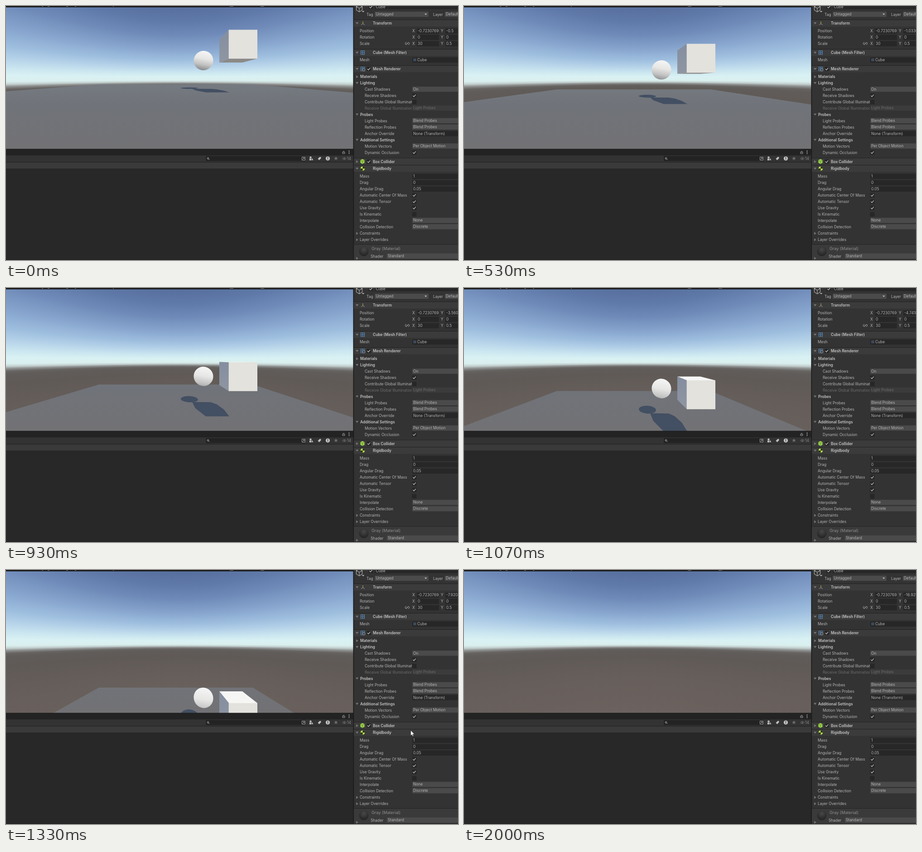
These frames come from a looping animation (998 px wide and 561 px high, 2140 ms). An HTML page with a canvas:

```html
<!DOCTYPE html>
<html lang="en">
<head>
<meta charset="utf-8">
<title>Falling rigidbodies</title>
<style>
html, body { margin: 0; width: 100%; height: 100%; overflow: hidden; background: #282828; }
canvas, svg { position: absolute; left: 0; top: 0; display: block; }
text { font: 8.38px Inter, Roboto, sans-serif; fill: #b6b6b6; white-space: pre; }
.bold { font-weight: 600; fill: #c6c6c6; }
.dim { fill: #6c6c6c; }
</style>
</head>
<body>
<canvas id="sky" width="767" height="316"></canvas>
<svg id="stage" width="998" height="561" viewBox="0 0 998 561">
  <defs>
    <clipPath id="view"><rect x="0" y="3" width="767" height="313"/></clipPath>
    <clipPath id="labels"><rect x="768" width="128" height="561"/></clipPath>
    <clipPath id="posX"><rect x="907" width="48" height="100"/></clipPath>
    <linearGradient id="ground" gradientUnits="userSpaceOnUse" x1="0" y1="168" x2="0" y2="316">
      <stop offset="0" stop-color="#767b82"/><stop offset=".35" stop-color="#707379"/>
      <stop offset="1" stop-color="#727275"/>
    </linearGradient>
    <linearGradient id="side" x2="0" y2="1">
      <stop offset="0" stop-color="#848e9f"/><stop offset="1" stop-color="#8f96a2"/>
    </linearGradient>
    <linearGradient id="white" x1=".6" y1="0" x2=".4" y2="1">
      <stop offset="0" stop-color="#f6f6f6"/><stop offset=".4" stop-color="#e6e6e5"/>
      <stop offset=".7" stop-color="#c2c2c2"/><stop offset="1" stop-color="#86878a"/>
    </linearGradient>
    <radialGradient id="gray" cx=".5" cy=".3" r=".7">
      <stop offset="0" stop-color="#484848"/><stop offset="1" stop-color="#222"/>
    </radialGradient>
  </defs>
  <g clip-path="url(#view)">
    <path id="floor" fill="url(#ground)"/>
    <g fill="#434f62"><ellipse id="ballShade"/><path id="cubeShade"/></g>
    <ellipse id="ball" fill="url(#white)"/>
    <path id="cubeTop" fill="#f6f6f5"/>
    <path id="cubeBottom" fill="#8b8985"/>
    <path id="cubeSide" fill="url(#side)"/>
    <path id="cubeFront" fill="#e3e2dd"/>
  </g>
  <g id="ui"></g>
  <text id="posY" x="972" y="58"></text>
  <path id="cursor" d="M0 0V12L2.8 9.5L4.6 13.5L6.4 12.7L4.7 8.8H8.4Z" fill="#fff" stroke="#222" stroke-width=".7"/>
</svg>
<script>
const byId = id => document.getElementById(id);
const set = (id, attrs) => {
  for (const key in attrs) byId(id).setAttribute(key, attrs[key]);
};
const poly = points => "M" + points.map(p => p.map(v => v.toFixed(2)).join(" ")).join("L") + "Z";
const CX = 383.5, CY = 160;

// The horizon bends as elevation is projected onto a flat view.
function paintSky() {
  const ctx = byId("sky").getContext("2d");
  const sky = ctx.createLinearGradient(0, -160, 0, 160);
  [[-160, "#566e9c"], [-125, "#5f79a9"], [-95, "#6f8ab8"], [-65, "#86a4cd"], [-40, "#9fbfdf"],
   [-25, "#b6d3e9"], [-13, "#cbe6f0"], [-4, "#d9f1f3"], [4, "#daf0ef"], [7.5, "#c3d0cf"],
   [10.5, "#8d908f"], [14, "#666361"], [18, "#605c59"], [30, "#605a57"], [80, "#675f5b"], [160, "#6c625f"]]
    .forEach(([e, color]) => sky.addColorStop((e + 160) / 320, color));
  ctx.fillStyle = sky;
  for (let x = 0; x < 767; x++) {
    ctx.setTransform(1, 0, 0, Math.hypot(1, (x - CX) / 270), x, CY);
    ctx.fillRect(0, -160, 1, 320);
  }
}

let ui = "";
const rect = (x, y, w, h, fill, more = "") =>
  ui += `<rect x="${x}" y="${y}" width="${w}" height="${h}" fill="${fill}" ${more}/>`;
const path = (d, fill, stroke = "none", width = 1) =>
  ui += `<path d="${d}" fill="${fill}" stroke="${stroke}" stroke-width="${width}"/>`;
const circle = (x, y, r, fill, more = "") =>
  ui += `<circle cx="${x}" cy="${y}" r="${r}" fill="${fill}" ${more}/>`;
const text = (x, y, s, kind = "", more = "") =>
  ui += `<text x="${x}" y="${y + 3}" class="${kind}" ${more}>${s}</text>`;
const label = (x, y, s, kind = "") => {
  ui += '<g clip-path="url(#labels)">';
  text(x, y, s, kind);
  ui += "</g>";
};
const fold = (y, open) =>
  path(open ? `M772 ${y - 2}h6.4l-3.2 4.6z` : `M773.2 ${y - 3}v6.4l4.6-3.2z`, "#747474");
function check(x, y, on = true) {
  rect(x - 5, y - 5, 10, 10, "#272727", 'rx="1.5"');
  if (on) path(`M${x - 3} ${y}l2.2 2.3l4-4.6`, "none", "#cfcfcf", 1.2);
}
function field(x, y, w, s, more = "") {
  rect(x, y - 5.5, w, 11.5, "#272727", 'rx="1.5"');
  text(x + 2, y, s, "", more);
}
function dropdown(y, s, kind = "", x = 897) {
  rect(x, y - 6, 998 - x + 3, 11.5, kind ? "#3b3b3b" : "#4a4a4a", 'rx="1.5"');
  text(x + 2, y - .3, s, kind);
}
function header(y, s, open, checked) {
  rect(768, y - 8, 230, 1, "#222");
  rect(768, y - 7, 230, 14.5, "#3b3b3b");
  fold(y, open);
  if (checked) check(801, y);
  text(810, y, s, "bold");
}
const grid = y => {
  rect(783, y - 4.5, 9, 9, "#2c4258");
  path(`M783 ${y - 4}h9m-9 4h9m-9 4h9M783.5 ${y - 4.5}v9m4-9v9m4-9v9`, "none", "#7399bb", .8);
};

function drawPanels() {
  rect(0, 0, 767, 3, "#1d1d1d");
  [[79, 3], [92, 4], [133, 4], [152, 3], [236, 2], [494, 8], [562, 8]]
    .forEach(([x, w]) => rect(x, 0, w, 1.2, "#757575"));

  rect(0, 316, 767, 14, "#232323");
  rect(0, 315.5, 767, 1, "#191919");
  rect(0, 330, 767, 14.5, "#333");
  rect(0, 344.5, 767, 1, "#202020");
  rect(0, 345.5, 767, 14, "#3a3a3a");
  rect(0, 359, 767, 1, "#252525");
  rect(0, 360, 767, 201, "#282828");
  rect(441, 331.5, 221, 11, "#232323", 'rx="2"');
  circle(446, 336.5, 1.7, "none", 'stroke="#bbb"');
  path("M447.3 337.8l2 2", "none", "#bbb", 1);
  path("M653.5 333.5h7v7h-7zM655 339l3.5-3.5m-2.5 0h2.5v2.5", "none", "#b5b5b5", .9);
  circle(672.5, 334.5, 2.2, "#bcbcbc");
  path("M670 337h4v4h-4zM675.5 335.5l3 5h-4z", "#bcbcbc");
  path("M688.5 337.5l4-4h3v3l-4 4z", "#c0c0c0");
  circle(710.5, 336.8, 4.6, "#c6c6c6");
  rect(709.8, 333.7, 1.4, 4, "#333");
  rect(709.8, 338.6, 1.4, 1.3, "#333");
  path("M728.5 332.3l1.3 3h3.2l-2.5 2 1 3.2-3-1.9-3 1.9 1-3.2-2.5-2h3.2z", "#6e6e6e");
  path("M742.5 337q4.5-5 9 0q-4.5 5-9 0z", "none", "#6e6e6e", 1);
  circle(747, 337, 1.5, "#6e6e6e");
  text(753, 337, "14", "", 'style="fill:#8c8c8c"');
  path("M743 323h5v3h-5zM744 323v-1.4q1.6-2.3 3.2 0v.6", "none", "#a8a8a8", .9);
  [320, 323, 326].forEach(y => circle(757.5, y, .9, "#c4c4c4"));

  rect(767, 0, 231, 561, "#333");
  rect(766.5, 0, 1.7, 561, "#1a1a1a");
  path("M773.5 1l6.5-4 6.5 4v8l-6.5 4-6.5-4zM773.5 1l6.5 4 6.5-4M780 5v8", "none", "#a8a8a8", 1.2);
  path("M785.5 11h6l-3 3z", "#b0b0b0");
  check(805.5, 2);
  rect(814, -5, 186, 12, "#272727");
  text(816.5, 2, "Cube");
  text(796, 18.5, "Tag");
  rect(814, 12.5, 119, 11.5, "#4a4a4a", 'rx="1.5"');
  text(816.5, 18, "Untagged");
  path("M924 16.7h5.6l-2.8 3.3z", "#bbb");
  text(943, 18.5, "Layer");
  dropdown(18.5, "Default", "", 969);

  header(38, "Transform", true);
  path("M788 40v-6", "none", "#a3b83f", 1.2);
  path("M788 39l-4 2.5", "none", "#bd6a58", 1.2);
  path("M788 39l4 2.5", "none", "#5a90c8", 1.2);
  [["Position", "-0.7230769", ""], ["Rotation", "0", "0"], ["Scale", "30", "0.5"]]
    .forEach(([name, x, y], i) => {
      const row = 55 + 14 * i;
      text(781, row, name);
      text(897, row, "X");
      text(960, row, "Y");
      field(907, row, 49, x, 'clip-path="url(#posX)"');
      field(970, row, 30, y);
    });
  path("M884.5 80.5h-1a2.2 2.2 0 0 0 0 4.5h1m3-4.5h1a2.2 2.2 0 0 1 0 4.5h-1M884 82.8h4M883 86l6-6", "none", "#aaa", .9);

  header(103, "Cube (Mesh Filter)", true);
  grid(103);
  text(781, 119, "Mesh");
  field(897, 119, 103, "");
  rect(899.5, 116, 6, 6, "#47586d");
  path("M899.5 119h6m-3-3v6", "none", "#263443", .8);
  text(908, 119, "Cube");

  header(139, "Mesh Renderer", true, true);
  grid(139);
  circle(790, 141, 2.6, "#333", 'stroke="#b5c6d4" stroke-width=".8"');
  [[156, "Materials", false], [170, "Lighting", true], [239.5, "Probes", true],
   [295.5, "Additional Settings", true]].forEach(([y, s, open]) => {
    fold(y, open);
    text(782, y, s, "bold");
  });
  [[184, "Cast Shadows", "On"], [253.5, "Light Probes", "Blend Probes"],
   [267.5, "Reflection Probes", "Blend Probes"], [309.5, "Motion Vectors", "Per Object Motion"]]
    .forEach(([y, s, value]) => { label(792, y, s); dropdown(y, value); });
  [[198, "Receive Shadows", true], [212, "Contribute Global Illumination", false],
   [323.5, "Dynamic Occlusion", true]]
    .forEach(([y, s, on]) => { label(792, y, s); check(901.5, y, on); });
  label(792, 226, "Receive Global Illumination", "dim");
  dropdown(225.5, "Light Probes", "dim");
  label(792, 281.5, "Anchor Override");
  field(897, 281.5, 103, "None (Transform)");

  header(343.5, "Box Collider", false, true);
  path("M787 338l4.6 2.3v6L787 349l-4.6-2.7v-6z", "#9bd14b");
  path("M782.5 340.5l4.5 2.3 4.5-2.3M787 343v5.5", "none", "#4f7924", .8);
  header(359, "Rigidbody", true);
  circle(787.5, 359, 4.8, "#b6dc55");
  path("M787.5 359v-4.8a4.8 4.8 0 0 1 4.8 4.8zM787.5 359v4.8a4.8 4.8 0 0 1-4.8-4.8z", "#263015");
  ["Mass", "Drag", "Angular Drag"].forEach((s, i) => {
    text(781, 376 + 14 * i, s);
    field(897, 376 + 14 * i, 103, ["1", "0", "0.05"][i]);
  });
  ["Automatic Center Of Mass", "Automatic Tensor", "Use Gravity", "Is Kinematic"].forEach((s, i) => {
    text(781, 418 + 14 * i, s);
    check(901.5, 418 + 14 * i, i < 3);
  });
  ["Interpolate", "Collision Detection"].forEach((s, i) => {
    text(781, 474 + 14 * i, s);
    dropdown(473.7 + 14 * i, ["None", "Discrete"][i]);
  });
  ["Constraints", "Layer Overrides"].forEach((s, i) => {
    fold(502 + 14 * i, false);
    text(781, 502 + 14 * i, s);
  });

  rect(768, 526, 230, 1, "#222");
  rect(768, 527, 230, 34, "#3a3a3a");
  circle(790, 542, 10.5, "url(#gray)");
  text(807, 535.5, "Gray (Material)", "", 'style="font-size:9.1px;fill:#909090"');
  text(805, 552.5, "Shader");
  dropdown(552.5, "Standard", "", 841);
  fold(557, false);
  rect(0, 560, 998, 1, "#1c1c1c");
  byId("ui").innerHTML = ui;
}

function keyed(at, keys) {
  if (at <= keys[0][0]) return keys[0][1];
  for (let i = 1; i < keys.length; i++) {
    const [t0, a] = keys[i - 1], [t1, b] = keys[i];
    if (at <= t1) return a + (b - a) * (at - t0) / (t1 - t0);
  }
  return keys[keys.length - 1][1];
}

// Square root of the drop grows linearly in free fall.
const fallKeys = [[1.3, 0], [8, 5.568], [12, 8.803], [16, 12.309], [20, 15.54], [24, 18.73], [30, 23.6]];
const stepKeys = [[3.7, 0], [8, 16], [12, 31], [16, 46], [20, 61], [24, 75], [30, 91]];
const cursorX = [[18, 972], [20, 893.5], [24, 842], [30, 850]];
const cursorY = [[18, 453], [20, 354], [24, 276], [29, -20]];
const shadeOutline = [[411, .618], [452, .622], [465, .652], [481, .73], [493, .832], [441, .832], [418, .71]];

function render(ms) {
  let tick = Math.floor(ms / (200 / 3)) + 1;
  while (Math.round(tick * 20 / 3) * 10 > ms) tick--;
  tick = Math.min(tick, 30);
  const drop = keyed(tick, fallKeys) ** 2;
  const groundY = depth => CY + depth * (37 + drop);

  const far = groundY(.358);
  const extend = x => [CX + (x - CX) * 30, CY + (far - CY) * 30];
  set("floor", { d: poly([[205, far], [545, far], extend(545), extend(205)]) });

  const shadeY = groundY(.577);
  set("ballShade", { cx: 405, cy: shadeY, rx: 19, ry: (shadeY - CY) * .08,
    transform: `rotate(${drop * .025} 405 ${shadeY})` });
  set("cubeShade", { d: poly(shadeOutline.map(([x, depth]) => [x, groundY(depth)])) });

  const ballY = 120.5 + drop * .67;
  const dx = 436 - CX, dy = ballY - CY;
  const turn = Math.atan2(dy, dx) * 180 / Math.PI - (dy > 0 ? 90 : -90);
  set("ball", { cx: 436, cy: ballY, rx: 21.3, ry: 21.3 + (dx * dx + dy * dy) * 9e-5,
    transform: `rotate(${turn} 436 ${ballY})` });
  // Seen from higher up, more of the lit half shows.
  set("white", { y2: 1 + drop * .002, gradientTransform: `rotate(${-turn} .5 .5)` });

  const top = 52.5 + drop, bottom = top + 63.7;
  const back = (x, y) => [CX + (x - CX) * .8065, CY + (y - CY) * .8065];
  const face = (x0, y0, x1, y1) => poly([[x0, y0], [x1, y1], back(x1, y1), back(x0, y0)]);
  set("cubeTop", { d: top > CY ? face(492, top, 555, top) : "" });
  set("cubeBottom", { d: bottom < CY ? face(492, bottom, 555, bottom) : "" });
  set("cubeSide", { d: face(492, top, 492, bottom) });
  set("cubeFront", { d: poly([[491.7, top], [555, top], [555, bottom], [491.7, bottom]]) });

  const n = Math.round(keyed(tick, stepKeys));
  byId("posY").textContent = n ? (-.5 - .001962 * n * (n + 1)).toFixed(5) : "-0.5";
  set("cursor", { transform: `translate(${keyed(tick, cursorX)} ${keyed(tick, cursorY)})`,
    visibility: tick >= 18 && tick < 29 ? "visible" : "hidden" });
}

paintSky();
drawPanels();
const start = performance.now();
function loop() {
  render((performance.now() - start) % 2140);
  requestAnimationFrame(loop);
}
loop();
</script>
</body>
</html>
```
